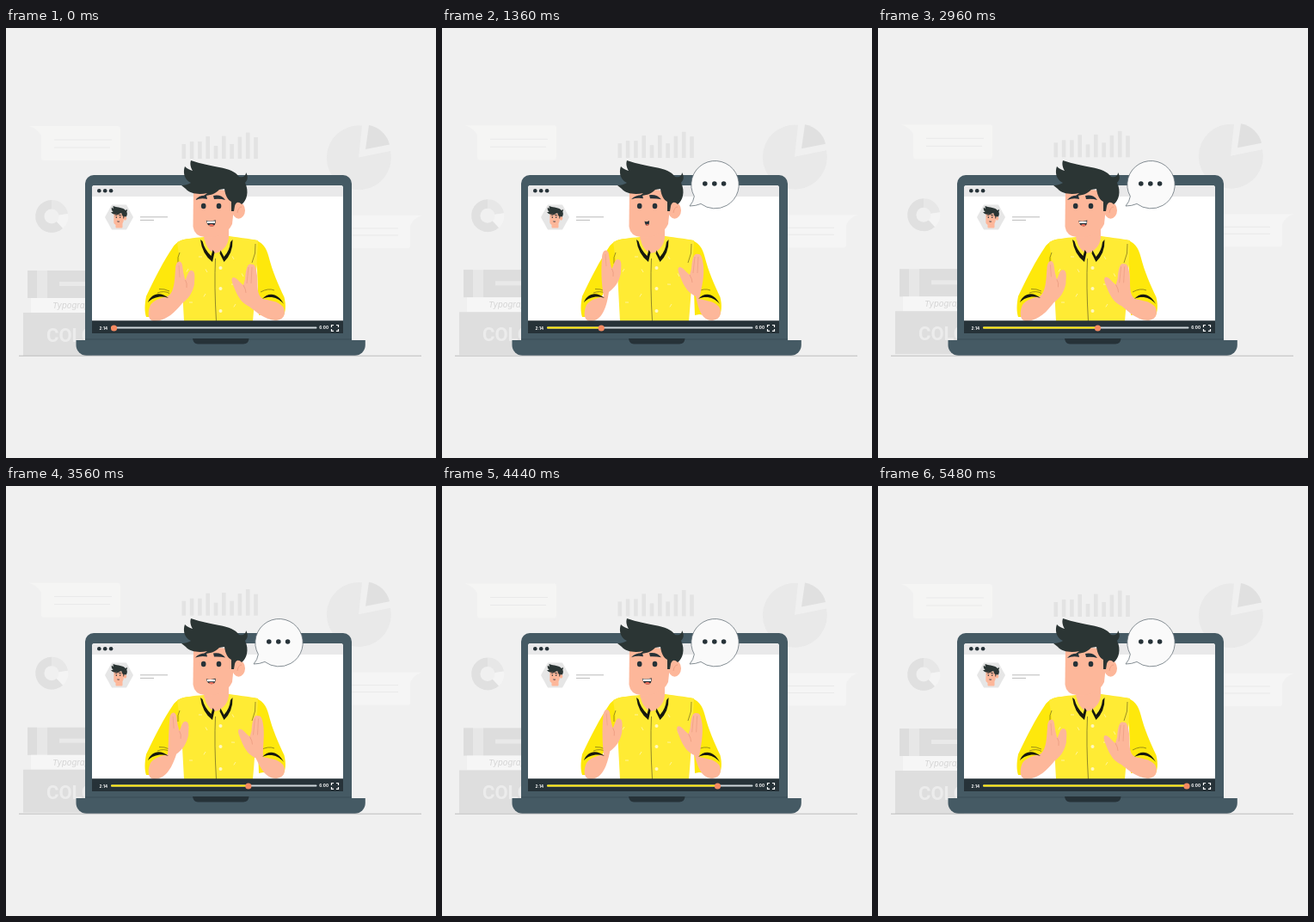
An HTML page with a canvas that plays this animation: 500x500 px, repeating every 5.52 s.

```html
<!DOCTYPE html>
<html lang="en">
<head>
<meta charset="utf-8">
<title>Video lesson</title>
<style>
html, body { margin: 0; width: 100%; height: 100%; overflow: hidden; background: #f0f0f0; }
canvas { display: block; width: 500px; height: 500px; }
</style>
</head>
<body>
<canvas id="stage"></canvas>
<script>
const LOOP = 5520;
const DARK = '#263238', SLATE = '#455a64', SKIN = '#fdb79a', FOLD = '#e8977c';
const YELLOW = '#ffeb34', SLEEVE = '#fee80c', HAIR = '#2b3534', INK = '#16180e';
const canvas = document.getElementById('stage');
const dpr = window.devicePixelRatio || 1;
canvas.width = canvas.height = 500 * dpr;
const c = canvas.getContext('2d');

const clamp = v => Math.max(0, Math.min(1, v));
const wave = (t, period) => (1 - Math.cos(2 * Math.PI * t / period)) / 2;

function rect(x, y, w, h, color, r = 0) {
  c.fillStyle = color;
  c.beginPath();
  c.roundRect(x, y, w, h, r);
  c.fill();
}
function oval(x, y, rx, ry, color) {
  c.fillStyle = color;
  c.beginPath();
  c.ellipse(x, y, rx, ry, 0, 0, 7);
  c.fill();
}
const dot = (x, y, r, color) => oval(x, y, r, r, color);
function fill(d, color) {
  c.fillStyle = color;
  c.fill(new Path2D(d));
}
function line(d, color, width = 1) {
  c.strokeStyle = color;
  c.lineWidth = width;
  c.stroke(new Path2D(d));
}
function text(s, x, y, font, color) {
  c.font = font;
  c.fillStyle = color;
  c.fillText(s, x, y);
}

function drawBackdrop(t) {
  c.save();
  c.translate(0, -1.7 * wave(t, LOOP));

  fill('M27 114H130Q133 114 133 117V151Q133 154 130 154H44Q41 154 41 151V125Q36 117 27 114Z', '#f5f5f4');
  line('M56 130H123M56 139H121', '#e9e9e9');

  const tops = [135, 132, 132, 126, 137, 125.5, 135, 126.5, 121.5, 127];
  tops.forEach((y, i) => rect(204.5 + i * 9.3, y, 4.6, 152 - y, '#e3e3e3'));

  fill('M410 150.5L414 113.5A37.5 37.5 0 1 0 447 143Z', '#e9e9e9');
  fill('M418 141L422 113A30 30 0 0 1 446 135.5Z', '#e0e0e0');

  fill('M483 218H380V256H467Q470 256 470 253V230Q474 221 483 218Z', '#f5f5f5');
  line('M395 233H456M395 241H456', '#e9e9e9');

  fill('M53 219V200A19 19 0 0 1 72 216Z', '#e7e7e7');
  fill('M53 219L72 216A19 19 0 0 1 66 233Z', '#f4f4f4');
  fill('M53 219L66 233A19 19 0 1 1 53 200Z', '#e0e0e0');
  dot(53, 219, 8.5, '#f0f0f0');

  rect(25, 282, 75, 32, '#e7e7e7');
  rect(25, 282, 11, 32, '#dddddd');
  rect(48, 282, 52, 32, '#dddddd');
  rect(62, 295, 38, 5, '#e9e9e9');
  rect(29, 314, 71, 17, '#f6f6f6');
  text('Typography', 54, 326, 'italic 9.5px Inter, sans-serif', '#d5d5d5');
  rect(20, 331, 80, 50, '#dedede');
  text('COLOR', 47, 365, 'bold condensed 22px Roboto, sans-serif', '#ececec');
  c.restore();

  line('M15 381.2H483', '#bdbdbd');
}

function drawLaptop() {
  rect(92, 171, 310, 200, SLATE, 10);
  rect(100, 183, 292, 172, '#ffffff', [3, 3, 0, 0]);
  rect(100, 183, 292, 13, '#e9e9ea', [3, 3, 0, 0]);
  [108.3, 115.2, 122.1].forEach(x => dot(x, 189.2, 2.3, DARK));

  // avatar
  fill('M115 220L123 205.5H140L148 220L140 234.5H123Z', '#e6e6e6');
  rect(127.5, 226, 8, 6.5, SKIN, 1);
  c.save();
  c.translate(71.6, 169);
  c.scale(.247, .247);
  drawHead(0);
  drawMouth(0);
  c.restore();
  line('M156 219.8H188M156 223.400H172', '#8c8c8c', .6);
}

function drawArms(p) {
  // Hands swing from fixed elbows; "half" points follow at half the distance.
  const mover = (dx, dy) => k => (x, y) => ` ${x + dx * p * k} ${y + dy * p * k} `;
  let make = mover(-11, -13), h = make(1), half = make(.5);
  fill('M168 322C172 316 180 314 188 312C' + h(196, 308) + h(196, 292) + h(197, 281) +
    'C' + h(197, 270) + h(204, 269) + h(205, 276) + 'C' + h(206, 284) + h(207, 288) + h(208.5, 293) +
    'C' + h(211, 288) + h(212, 281) + h(216, 282) + 'C' + h(221, 283) + h(219, 292) + h(219, 298) +
    'C' + h(217, 308) + h(212, 315) + h(205, 320) +
    'C' + half(197, 330) + ' 187 340 173 341C165 341 164 331 168 322Z', SKIN);
  line('M' + h(208.5, 293) + 'Q' + h(211, 297) + h(210, 302), FOLD, .7);
  line('M' + h(201, 276) + 'L' + h(202, 290), FOLD, .5);

  make = mover(12, -12); h = make(1); half = make(.5);
  fill('M322 324C316 317 306 317 299 315C' + h(291, 311) + h(293, 300) + h(292, 288) +
    'C' + h(291, 279) + h(289, 274) + h(286, 275) + 'C' + h(281, 273) + h(279, 279) + h(278, 292) +
    'L' + h(276, 299) + 'C' + h(271, 295) + h(268, 290) + h(264, 290) +
    'C' + h(260, 292) + h(265, 300) + h(267, 306) + 'C' + h(271, 315) + h(275, 320) + h(283, 324) +
    'C' + half(292, 331) + ' 301 339 313 340C324 340 326 331 322 324Z', SKIN);
  line('M' + h(282, 278) + 'L' + h(280, 297) + 'M' + h(286, 278) + 'L' + h(285, 297), FOLD, .6);
  line('M' + h(276, 299) + 'Q' + h(279, 304) + h(279, 308), FOLD, .7);
}

function drawMouth(t) {
  if (t > 5440) return;
  // time, width, height
  const keys = [[0, 11, 7.5], [600, 8, 4], [1360, 5.5, 6], [2120, 9, 5.5], [2960, 10, 7],
    [3560, 11, 6.5], [4440, 11, 7.5], [5440, 5, 2]];
  const i = keys.findIndex(k => k[0] >= t) || 1;
  const [a, b] = [keys[i - 1], keys[i]];
  const f = (t - a[0]) / (b[0] - a[0]);
  const w = (a[1] + (b[1] - a[1]) * f) / 2, h = a[2] + (b[2] - a[2]) * f;
  c.save();
  c.translate(238.3, 227 - h / 2);
  const shape = new Path2D(`M${-w} .5Q0 2 ${w} 0Q${w} ${h} ${w * .2} ${h}Q${-w * .8} ${h} ${-w} .5Z`);
  c.fillStyle = DARK;
  c.fill(shape);
  c.clip(shape);
  if (w > 3.5) rect(-w + .8, 1.3, 2 * w - 1.6, h * .32, '#ffffff');
  oval(.5, h, w * .6, h * .35, '#f0705c');
  c.restore();
}

function drawHead(p) {
  oval(270.5, 212, 7.5, 9.7, SKIN);
  line('M269 215Q270 208 274 208', FOLD, .7);
  fill('M218 185L217.500 231Q219 242 231 243Q255 245 263 228L267 190Z', SKIN);
  fill('M215 154C227 158 238 160 248 162C259 164 267 167 271 173C276 174 279 172 279 168C282 173 281 177 278 180' +
    'C283 190 280 201 274 205C270 201 267 203 266 207L265 213H262L262 202C258 200 255 195 254 187' +
    'L248 188C243 193 237 195 230 195L234 192C225 194 214 193 209 187' +
    'L204 183C208 183 212 182 215 180C206 176 206 166 208 161C211 164 214 165 217 166C214 161 214 157 215 154Z', HAIR);
  oval(229.7, 207, 2.8, 3.3, DARK);
  oval(247.5, 207, 2.8, 3.3, DARK);
  const lift = p * .8;
  fill(`M220 ${200 - lift}Q225 194 233 ${195 - lift}L234 ${199 - lift}Q227 197 220 ${200 - lift}Z`, DARK);
  fill(`M241 ${195 - lift}Q250 193 255 ${200 - lift}Q249 198 242 ${199 - lift}Z`, DARK);
}

function drawMan(t) {
  const p = wave(t, LOOP / 2);
  c.save();
  c.beginPath();
  c.rect(100, 150, 292, 191);
  c.clip();

  // sleeves follow the arms on their inner side
  fill(`M215 245C204 245 198 249 194 255C183 271 173 291 163 312C161 322 161 330 163 336H171` +
    `L${191 - 6 * p} 314L${206 - 7 * p} ${300 - 15 * p}Z`, SLEEVE);
  fill('M286 246C298 247 303 256 305.500 266C310 284 317 299 323.500 313C326 323 325 331 322 336L299 333L294 334L292 280Z', SLEEVE);
  fill('M230 243C218 244 207 245 199 249L204 285L207 341H287C289 320 290 300 291 285L293 247C284 245 272 244 260 242Z', YELLOW);

  // flecks on the cloth
  const flecks = [[224, 266], [212, 280], [234, 284], [213, 319], [232, 309], [265, 269], [262, 298], [267, 321], [276, 289]];
  flecks.forEach(([x, y], i) => {
    const a = i * 2.1;
    line(`M${x} ${y}l${4 * Math.cos(a)} ${4 * Math.sin(a)}`, '#fff5a5', .9);
  });
  line('M202 261Q199 266 200 274M290 251Q291 262 286 273M178 303.500Q184 303 190 306M176 308Q184 305 190 308.500M296 307Q305 302 312 305', '#70681c', .7);
  line('M243.500 268Q242 300 244.500 341', '#625c22', .7);
  [279, 303, 329].forEach(y => dot(249.500, y, 2, '#fff8c0'));

  // neck and collar
  fill('M231 235L230 249Q236 260 241 262Q250 263 259 249V234Z', SKIN);
  fill('M228 245L231 246Q233 257 241 261L239 271Q229 261 226 248Z', YELLOW);
  fill('M259 244L262 246Q263 261 253 271L249 261Q257 256 259 244Z', YELLOW);
  fill('M226 246L228.500 248Q231 258 238.500 265L240.500 258L242.500 261L240 272Q228 263 226 246Z', INK);
  fill('M263.500 246L261 249Q260 259 253.500 266L249.500 258.500L248.500 262L253.500 272Q264 262 263.500 246Z', INK);

  drawArms(p);
  fill('M165 319C169 308 180 306 189 314C180 311 171 313 165 319Z', INK);
  fill('M298 315C306 306 317 309 323 321C316 313 307 311 298 315Z', INK);
  c.restore();

  drawHead(p);
  drawMouth(t);
}

function drawPlayer(t) {
  rect(100, 340.3, 292, 14.7, DARK);
  const x = Math.min(125.5 + t * .0439, 359);
  rect(122, 347.6, 239.5, 2, '#cfd8dc', 1);
  rect(122, 347.6, x - 122, 2, SLEEVE, 1);
  dot(x, 349, 3.6, '#f58a62');
  const font = 'bold 4.6px Inter, sans-serif';
  text('2:14', 108.5, 350.6, font, '#ffffff');
  text('6:00', 364.3, 350.4, font, '#ffffff');
  line('M378.500 348V345.500H381M384 345.500H386.500V348M386.500 350V352.300H384M381 352.300H378.500V350', '#ffffff', 1.2);

  rect(81.5, 363, 336.3, 17.8, SLATE, [0, 0, 12, 12]);
  rect(92, 361, 310, 2, '#3f535d');
  fill('M217 361H282.500Q282 367.500 276 367.500H223Q218 367.500 217 361Z', DARK);
}

function drawBubble(t) {
  const s = 1 - Math.pow(1 - clamp((t - 280) / 320), 3);
  if (!s) return;
  c.save();
  c.translate(288, 207);
  c.scale(s, s);
  c.translate(-288, -207);
  c.beginPath();
  c.arc(317.5, 182.2, 27.7, 2.63, 2.21 + 2 * Math.PI);
  c.quadraticCurveTo(295, 207, 288, 207);
  c.quadraticCurveTo(292.5, 202, 293.3, 195.8);
  c.closePath();
  c.fillStyle = '#fafafa';
  c.fill();
  c.strokeStyle = '#68737a';
  c.lineWidth = .8;
  c.stroke();
  [305.8, 316.8, 327.6].forEach(x => dot(x, 181, 2.8, DARK));
  c.restore();
}

function frame(now) {
  const t = now % LOOP;
  c.setTransform(dpr, 0, 0, dpr, 0, 0);
  rect(0, 0, 500, 500, '#f0f0f0');
  drawBackdrop(t);
  drawLaptop();
  drawMan(t);
  drawPlayer(t);
  drawBubble(t);
}

const start = performance.now();
function tick() {
  frame(performance.now() - start);
  requestAnimationFrame(tick);
}
tick();
</script>
</body>
</html>
```
